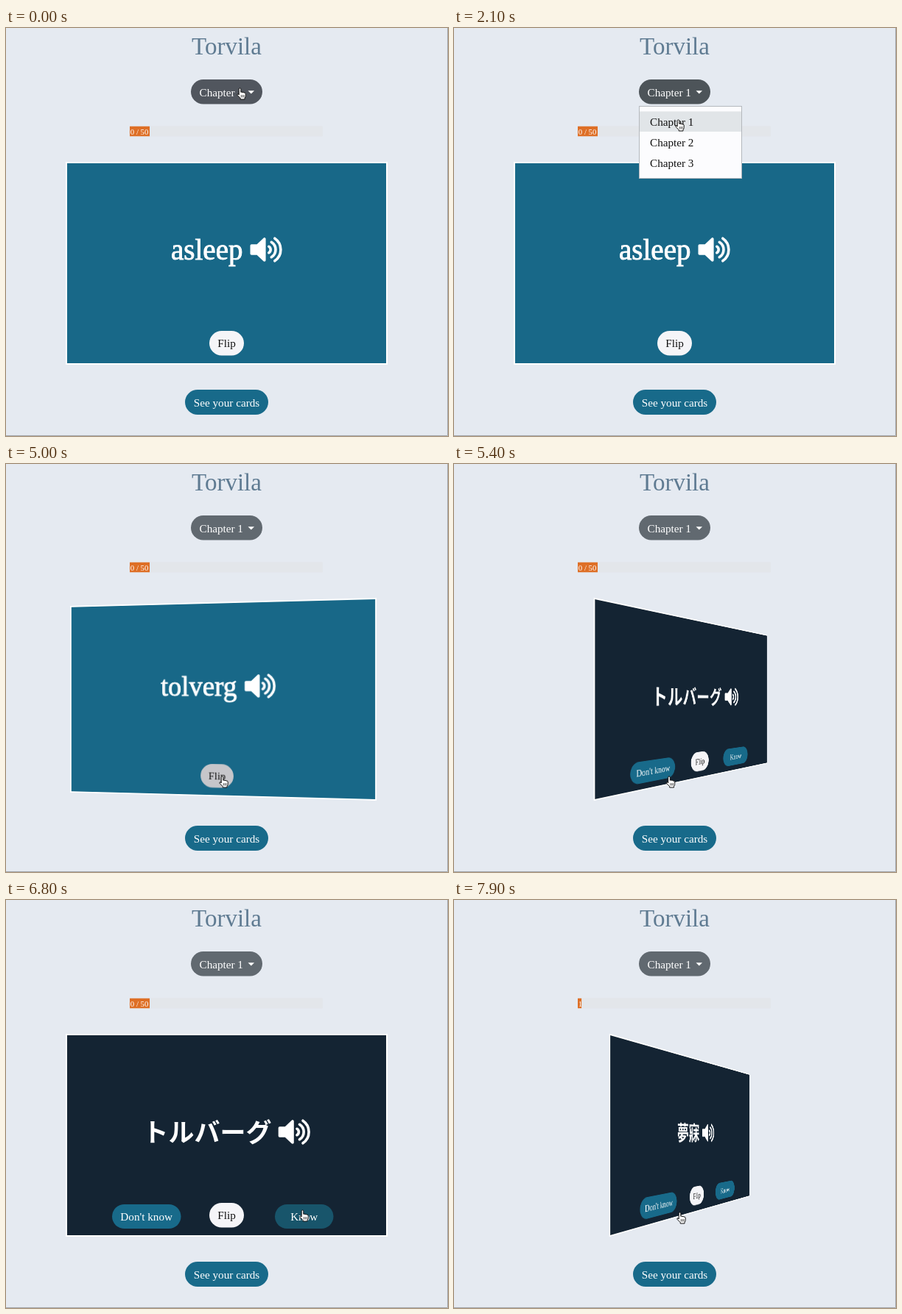
An HTML page for the animation above (8 s loop, 600 by 555 pixels).

```html
<!DOCTYPE html>
<html lang="en">
<head>
<meta charset="utf-8">
<title>Flashcards</title>
<style>
html, body { margin: 0; width: 100%; height: 100%; overflow: hidden; background: #e5eaf1; }
svg, #card { position: absolute; left: 0; top: 0; display: block; }
text { font: 15.2px "Liberation Serif", serif; fill: #fff; }
.mid { text-anchor: middle; }
.word { font-size: 39px; stroke: #fff; stroke-width: .9px; }
.kana { font: 700 35px "Noto Sans CJK JP", "Noto Sans CJK", sans-serif; }
.dark { fill: #111; }
.blue { fill: #186a8a; }
#card { left: 81px; top: 182px; width: 437px; height: 276px; transform-style: preserve-3d; }
#card svg { backface-visibility: hidden; }
#back { transform: rotateY(180deg); }
.face { stroke: #fff; stroke-width: 2px; }
</style>
</head>
<body>
<svg width="600" height="555">
  <path d="M599.5 0V554.5H0" fill="none" stroke="#a3a7ac"/>
  <text class="mid" x="299.5" y="36" style="font-size:33px;fill:#5f7b92">Torvila</text>
  <rect id="chapter" x="251" y="70" width="97" height="33.5" rx="16.75"/>
  <text x="262.5" y="93">Chapter 1</text>
  <path d="M328.5 85.3h8.6l-4.3 4.3z" fill="#fff"/>
  <rect x="168" y="133.5" width="262" height="14" rx="1" fill="#e3e6ea"/>
  <svg id="bar" x="168" y="133.5" height="14">
    <rect width="100%" height="14" fill="#de6f26"/>
    <text id="score" x=".8" y="11.3" style="font-size:10.8px"></text>
  </svg>
  <rect class="blue" x="243" y="492" width="113" height="34" rx="17"/>
  <text class="mid" x="299.5" y="515">See your cards</text>
</svg>

<div id="card">
  <svg id="front" width="437" height="276" viewBox="81 182 437 276">
    <defs>
      <g id="sound" stroke="#fff" stroke-width="3.6" stroke-linecap="round" stroke-linejoin="round" fill="none">
        <path d="M2 11H10L19.5 2V31L10 22H2Z" fill="#fff"/>
        <path d="M25.5 12.3a4.9 4.9 0 0 1 0 8.4M29 6.3a12 12 0 0 1 0 20.4M33.5 1.2a18.5 18.5 0 0 1 0 30.6"/>
      </g>
      <g id="flip">
        <rect x="276" y="412" width="47" height="33.5" rx="16.75" style="fill:var(--flip)"/>
        <text class="mid dark" x="299.5" y="434">Flip</text>
      </g>
    </defs>
    <rect class="face" x="82" y="183" width="435" height="274" fill="#186888"/>
    <text id="word" class="word" y="315"></text>
    <use id="frontSound" href="#sound" y="285"/>
    <use href="#flip"/>
  </svg>
  <svg id="back" width="437" height="276" viewBox="81 182 437 276">
    <rect class="face" x="82" y="183" width="435" height="274" fill="#142433"/>
    <text id="kana" class="kana" y="329"></text>
    <use id="backSound" href="#sound" y="299"/>
    <rect class="blue" x="144" y="414" width="93.5" height="33" rx="16.5"/>
    <text class="mid" x="190.7" y="436">Don't know</text>
    <use href="#flip"/>
    <rect id="know" x="365" y="414" width="79.5" height="33" rx="16.5"/>
    <text class="mid" x="404.7" y="436">Know</text>
  </svg>
</div>

<svg width="600" height="555">
  <g id="menu">
    <rect x="251.5" y="106.5" width="139" height="98" fill="#fcfcfe" stroke="#b4b8bd"/>
    <rect id="item" x="252" y="113.5" width="138" height="27.5" fill="#e1e5e8"/>
    <text class="dark" x="266" y="133">Chapter 1</text>
    <text class="dark" x="266" y="161">Chapter 2</text>
    <text class="dark" x="266" y="189">Chapter 3</text>
  </g>
  <g id="hand" stroke="#111" stroke-linejoin="round" stroke-linecap="round">
    <path d="M3.2 9.6V2.2a1.3 1.3 0 0 1 2.6 0V6.3q1.2-.9 2.2.3q1.2-.7 2 .4q1.8-.5 2.2 1.3V11.5q0 1.6-1.2 3V16H5.2V14.6L1 10.3q-.6-1.8 1-1.6z" fill="#fff"/>
    <path d="M6.3 10.5v2.6M8.2 10.5v2.6M10 10.5v2.6" fill="none" stroke-width=".7"/>
  </g>
</svg>

<script>
const $ = id => document.getElementById(id);
const LOOP = 8000, HALF = 217, DEPTH = 535, TURN = 1000;
const OPEN = 500, CLOSE = 2400, SWAP = 2800, FLIP = 4950, KNOW = 7000, FLIP_AGAIN = 7488;

// Pointer stops: time, x, y
const stops = [
  [0, 313, 81], [700, 313, 81], [1400, 300, 124], [2450, 300, 124],
  [3050, 374, 365], [3250, 374, 365], [4400, 289, 424], [5000, 289, 424],
  [5300, 287.5, 424], [6000, 287.5, 424], [6600, 398, 421], [7020, 398, 421],
  [7350, 302, 424], [LOOP, 302, 424]
];

const cards = {
  asleep: { x: 224, sound: 331.3, kana: '夢寐' },
  tolverg: { x: 218, sound: 338.5, kana: 'トルバーグ' }
};

// The CSS "ease" curve
function ease(x) {
  if (x <= 0) return 0;
  if (x >= 1) return 1;
  let lo = 0, hi = 1, p;
  for (let i = 0; i < 24; i++) {
    p = (lo + hi) / 2;
    if (.75 * (1 - p) * p + p ** 3 < x) lo = p; else hi = p;
  }
  const q = 1 - p;
  return .3 * q * q * p + 3 * q * p * p + p ** 3;
}

function pointer(t) {
  const i = stops.findIndex(s => s[0] > t);
  const [t0, x0, y0] = stops[i - 1], [t1, x1, y1] = stops[i];
  const k = (t - t0) / (t1 - t0), e = k * k * (3 - 2 * k);
  return [x0 + (x1 - x0) * e, y0 + (y1 - y0) * e];
}

// The near edge stays at the picture plane while the card turns
function turnCard(angle) {
  const sin = Math.sin(angle), cos = Math.cos(angle);
  const far = DEPTH / (DEPTH + 2 * HALF * sin);
  const dx = -140 * sin * cos * far, dz = -HALF * sin;
  $('card').style.transform =
    `perspective(${DEPTH}px) translate3d(${dx}px,0,${dz}px) rotateY(${-angle}rad)`;
}

function setCard(name) {
  const { x, sound, kana } = cards[name];
  const left = 299.5 - (kana.length * 35 + 53) / 2;
  $('word').textContent = name;
  $('word').setAttribute('x', x);
  $('frontSound').setAttribute('x', sound);
  $('kana').textContent = kana;
  $('kana').setAttribute('x', left);
  $('backSound').setAttribute('x', left + kana.length * 35 + 9);
}

function draw(t) {
  const [x, y] = pointer(t);
  const turn = ease((t - (t < KNOW ? FLIP : FLIP_AGAIN)) / TURN);
  const open = t >= OPEN && t < CLOSE;
  const over = (x0, x1, y0, y1) => x + 4 > x0 && x + 4 < x1 && y > y0 && y < y1;

  setCard(t >= SWAP && t < KNOW ? 'tolverg' : 'asleep');
  turnCard(turn * Math.PI);

  $('chapter').style.fill = open ? '#4d5459' : over(251, 348, 70, 103) ? '#51565e' : '#616970';
  $('menu').style.display = open ? '' : 'none';
  $('item').style.display = over(252, 390, 113, 141) ? '' : 'none';

  const flat = turn < .2 || turn > .9;
  document.body.style.setProperty('--flip', flat && over(276, 323, 412, 445) ? '#c6c6ca' : '#f5f5f8');
  $('know').style.fill = turn > .9 && over(365, 444, 414, 447) ? '#18556b' : '#186a8a';

  $('bar').setAttribute('width', t < KNOW ? 27 : 5.3);
  $('score').textContent = t < KNOW ? '0 / 50' : '1 / 50';
  $('hand').setAttribute('transform', `translate(${x} ${y})`);
}

const start = performance.now();
function frame() {
  draw((performance.now() - start) % LOOP);
  requestAnimationFrame(frame);
}
frame();
</script>
</body>
</html>
```
